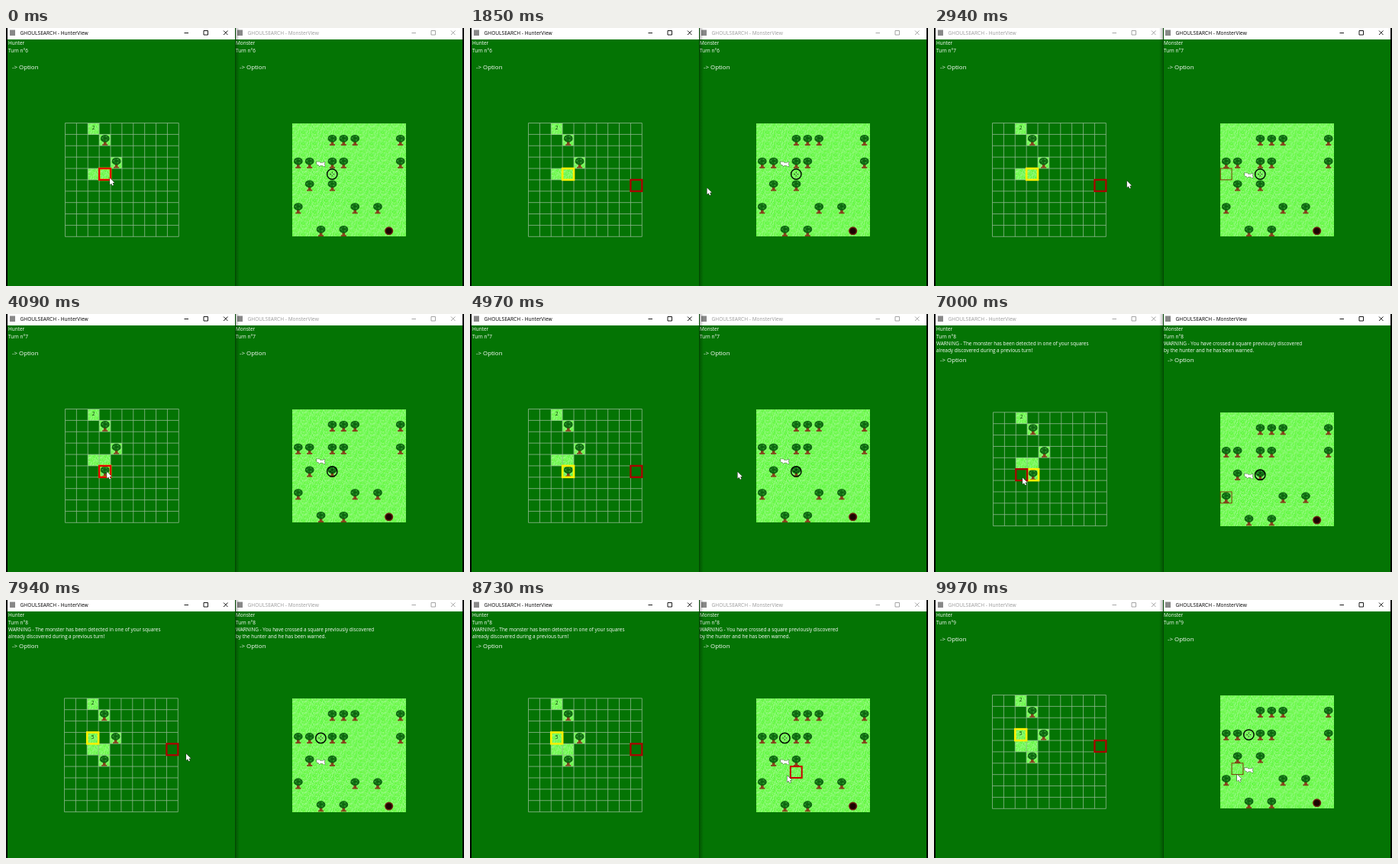
An HTML page with a canvas for the animation above (10 s loop, 600 px wide and 338 px high).

```html
<!DOCTYPE html>
<html lang="en">
<head>
<meta charset="utf-8">
<title>Hunt</title>
<style>
html, body { margin: 0; width: 100%; height: 100%; overflow: hidden; background: #047404; }
canvas { display: block; }
</style>
</head>
<body>
<canvas id="stage" width="600" height="338"></canvas>
<script>
const ctx = document.getElementById('stage').getContext('2d');
const LOOP = 10000, CELL = 14.88, SIZE = 10, APP = 'GHOULSEARCH';
const HUNTER_X = 77.5, MONSTER_X = 375.2, WINDOW_STEP = 298;
const REPLY = 40, HOVER_LAG = 20, FADE = 70;
const FONT = '"Open Sans", "Noto Sans", sans-serif';
const treeColumns = ['', '3459', '', '01349', '', '13', '', '057', '', '24'];

// The players click in turn, the monster first; each click focuses its window.
const clicks = [
  { t: 2090, cell: [2, 4] }, { t: 3690, cell: [3, 5] }, { t: 5250, cell: [2, 5] },
  { t: 7260, cell: [2, 3] }, { t: 9370, cell: [2, 6] }
].map((click, i) => ({ ...click, byMonster: i % 2 === 0 }));

const doneBy = (t, byMonster) => clicks.filter(c => c.byMonster === byMonster && t >= c.t + REPLY);
const isWarned = t => doneBy(t, true).length === 2;
const gridTop = t => isWarned(t) ? 128.8 : 124.5;
const isTree = ([c, r]) => treeColumns[r].includes(c);
const sameCell = (a, b) => a[0] === b[0] && a[1] === b[1];

// The pointer rests on every clicked cell and wanders between: time, x, y.
const restOn = ({ t, cell: [c, r], byMonster }) => [t - 60, t + REPLY].map(time => [
  time, (byMonster ? MONSTER_X : HUNTER_X) + (c + 0.5) * CELL, gridTop(t) + (r + 0.5) * CELL]);
const path = [
  [0, 136, 196], [250, 136, 196], [1030, 360, 212], [1850, 310, 209], [3550, 133, 206],
  [4200, 133, 206], [5560, 378, 241], [5730, 323, 239], [7000, 116, 214], [8300, 304, 212],
  [8500, 500, 265], [8746, 410, 227], [9700, 397, 228], [LOOP, 397, 228],
  ...clicks.flatMap(restOn)
].sort((a, b) => a[0] - b[0]);

function pointerAt(t) {
  const i = Math.max(1, path.findIndex(p => p[0] >= t));
  const [t0, x0, y0] = path[i - 1], [t1, x1, y1] = path[i];
  const k = (t - t0) / (t1 - t0);
  return [x0 + (x1 - x0) * k, y0 + (y1 - y0) * k];
}

function cellAt([x, y], left, top) {
  const cell = [Math.floor((x - left) / CELL), Math.floor((y - top) / CELL)];
  return cell.every(n => n >= 0 && n < SIZE) ? cell : null;
}

// Each board remembers the last cell crossed; a shot clears the monster's.
function hoversAt(t) {
  let hunter = [3, 4], monster = null, shots = 0;
  for (let s = 0; s <= t; s += 10) {
    const p = pointerAt(Math.max(0, s - HOVER_LAG)), top = gridTop(s);
    const fired = doneBy(s, false).length;
    if (fired > shots) monster = null;
    shots = fired;
    hunter = cellAt(p, HUNTER_X, top) || hunter;
    monster = cellAt(p, MONSTER_X, top) || monster;
  }
  return { hunter, monster };
}

function makeGrass() {
  const tile = document.createElement('canvas');
  tile.width = tile.height = 15;
  const g = tile.getContext('2d');
  let seed = 7;
  const rand = () => (seed = seed * 16807 % 2147483647) / 2147483647;
  for (let i = 0; i < 225; i++) {
    g.fillStyle = `hsl(${106 + rand() * 6}, 93%, ${59 + rand() * 17}%)`;
    g.fillRect(i % 15, Math.floor(i / 15), 1, 1);
  }
  return tile;
}
const grassTile = makeGrass();

function rect(x, y, w, h, color) {
  ctx.fillStyle = color;
  ctx.fillRect(x, y, w, h);
}

function text(s, x, y, size = 6.45, color = '#fff') {
  ctx.font = `${size}px ${FONT}`;
  ctx.fillStyle = color;
  ctx.fillText(s, x, y);
}

function disc(x, y, rx, ry, color) {
  ctx.fillStyle = color;
  ctx.beginPath();
  ctx.ellipse(x, y, rx, ry, 0, 0, 7);
  ctx.fill();
}

function shape(d, fill, stroke) {
  const outline = new Path2D(d);
  ctx.strokeStyle = stroke;
  ctx.lineWidth = 0.9;
  ctx.stroke(outline);
  ctx.fillStyle = fill;
  ctx.fill(outline);
}

function at(x, y, draw) {
  ctx.save();
  ctx.translate(x, y);
  draw();
  ctx.restore();
}

const inCell = (left, top, [c, r], draw) => at(left + c * CELL, top + r * CELL, draw);

function frame(color, width) {
  ctx.strokeStyle = color;
  ctx.lineWidth = width;
  ctx.strokeRect(0, 0, CELL, CELL);
}

function ground(cell) {
  ctx.drawImage(grassTile, 0, 0, 15, 15);
  if (isTree(cell)) tree();
}

function tree() {
  rect(5.8, 7, 3.6, 7, '#87401c');
  rect(4, 12.8, 7.2, 1.8, '#87401c');
  disc(7.6, 5.4, 5.9, 4.9, '#0d650f');
  for (let i = 0; i < 6; i++)
    disc(7.6 + Math.cos(i * 1.05) * 3.4, 5 + Math.sin(i * 1.05) * 2.6, 1.4, 1, i % 2 ? '#2c9a2a' : '#187d1a');
}

function hole() {
  disc(7.4, 7.4, 5.6, 5.5, '#6e2210');
  disc(7.4, 7.4, 4, 3.9, '#1c0502');
}

function monster() {
  shape('M2 5.6L3.6 6.6L5.4 5.8L6.4 7.4H10.4L13 6.2L12.2 8.6L13 12.2H11.2L9.6 10.8H7L5.6 12.2L4.6 10.4L2 9.4Z',
    '#fff', '#3a4a34');
}

function crosshair() {
  const mid = CELL / 2;
  ctx.strokeStyle = '#001000';
  ctx.lineWidth = 1.5;
  ctx.beginPath();
  ctx.arc(mid, mid, 6.7, 0, 7);
  ctx.stroke();
  ctx.lineWidth = 0.8;
  ctx.beginPath();
  for (let a = 0; a < 6; a += Math.PI / 2) {
    const dx = Math.cos(a), dy = Math.sin(a);
    ctx.moveTo(mid + dx * 1.3, mid + dy * 1.3);
    ctx.lineTo(mid + dx * 3, mid + dy * 3);
  }
  ctx.stroke();
}

function hunterBoard(top, hover, fired, target) {
  const left = HUNTER_X - (hover[0] === SIZE - 1 ? 1 : 0), end = SIZE * CELL;
  const known = [[2, 0], [3, 1], [4, 3], [2, 4], [3, 4], ...fired.map(shot => shot.cell)];
  for (const cell of known) inCell(left, top, cell, () => ground(cell));
  ctx.strokeStyle = '#91b991';
  ctx.lineWidth = 0.8;
  ctx.beginPath();
  for (let d = 0; d <= end + 1; d += CELL) {
    ctx.moveTo(left + d, top);
    ctx.lineTo(left + d, top + end);
    ctx.moveTo(left, top + d);
    ctx.lineTo(left + end, top + d);
  }
  ctx.stroke();
  const digit = (s, cell) => inCell(left, top, cell, () => text(s, 5.4, 8.3, 6.6, '#06380a'));
  digit('2', [2, 0]);
  if (fired.length > 1) digit('5', target);
  inCell(left, top, target, () => frame('#fff000', 2.6));
  inCell(left, top, hover, () => frame(sameCell(hover, target) ? '#e00000' : '#a80400', 2.3));
}

function monsterBoard(top, hover, monsterRow, target, mayMove) {
  const put = (cell, draw) => inCell(MONSTER_X, top, cell, draw);
  for (let i = 0; i < SIZE * SIZE; i++) {
    const cell = [i % SIZE, Math.floor(i / SIZE)];
    put(cell, () => ground(cell));
  }
  put([8, 9], hole);
  put([2, monsterRow], monster);
  put(target, crosshair);
  if (hover) put(hover, () => mayMove ? frame('#c80000', 2) : frame('#7c2800', 0.9));
}

function titleBar(name, focus) {
  const grey = 155 * (1 - focus), color = `rgb(${grey},${grey},${grey})`;
  rect(2, 0, WINDOW_STEP + 1, 15, '#fff');
  rect(5, 2.5, 7, 7.5, '#888');
  text(`${APP} - ${name}View`, 18.5, 8.9, 6.6, color);
  ctx.strokeStyle = color;
  ctx.lineWidth = 0.9;
  ctx.stroke(new Path2D('M233.5 6.5h5.5M259 3.5h5.5v5.5h-5.5zM285 3.5l5.5 5.5m0 -5.5l-5.5 5.5'));
}

function gameWindow(name, x, focus, turn, warning) {
  at(x, 0, () => {
    titleBar(name, focus);
    [name, 'Turn n°' + turn, ...warning].forEach((line, i) => text(line, 3, 22.4 + i * 9.1));
    text('-> Option', 8, warning.length ? 62.9 : 53.8, 7.9);
  });
}

function shadow(from, to, alpha) {
  const g = ctx.createLinearGradient(from, 0, to, 0);
  g.addColorStop(0, `rgba(0,0,0,${alpha})`);
  g.addColorStop(1, 'rgba(0,0,0,0)');
  rect(Math.min(from, to), 0, Math.abs(to - from), 338, g);
}

function monsterFocusAt(t) {
  const last = clicks.filter(c => t >= c.t).at(-1);
  if (!last) return 0;
  const fade = Math.min(1, (t - last.t) / FADE);
  return last.byMonster ? fade : 1 - fade;
}

function draw(t) {
  const fired = doneBy(t, false), moved = doneBy(t, true);
  const target = fired.at(-1)?.cell || [3, 4];
  const top = gridTop(t), hovers = hoversAt(t), turn = 6 + moved.length;
  const focus = monsterFocusAt(t);
  const warn = (...lines) => isWarned(t) ? lines : [];

  rect(0, 0, 600, 338, '#047404');
  gameWindow('Hunter', 0, 1 - focus, turn, warn(
    'WARNING - The monster has been detected in one of your squares',
    'already discovered during a previous turn!'));
  gameWindow('Monster', WINDOW_STEP, focus, turn, warn(
    'WARNING - You have crossed a square previously discovered',
    'by the hunter and he has been warned.'));
  shadow(300, 306, 0.3 * (1 - focus));
  shadow(301, 295, 0.3 * focus);
  rect(300, 0, 1, 338, '#034803');
  rect(0, 0, 2, 338, '#000');
  rect(598, 0, 2, 338, '#000');
  hunterBoard(top, hovers.hunter, fired, target);
  monsterBoard(top, hovers.monster, 3 + moved.length, target, fired.length === moved.length);
  const [x, y] = pointerAt(t);
  at(x, y + 0.6, () => shape('M0 0V8.6L2 6.8L3.4 9.8L4.9 9.1L3.5 6.3L6.1 6.1Z', '#fff', '#222'));
}

const start = performance.now();
function tick() {
  draw((performance.now() - start) % LOOP);
  requestAnimationFrame(tick);
}
tick();
</script>
</body>
</html>
```
